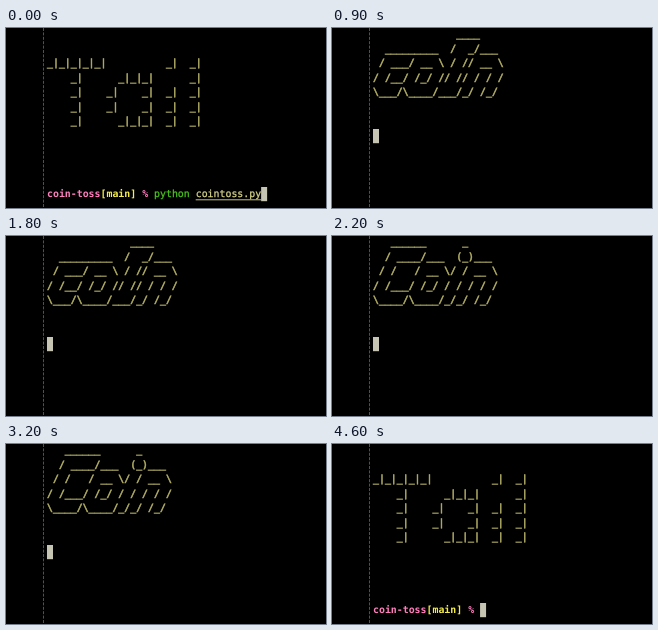
Write an HTML page that moves like this. It is 320 by 180 pixels and loops after 4900 ms.

```html
<!DOCTYPE html>
<html lang="en">
<head>
<meta charset="utf-8">
<title>Coin toss</title>
<style>
  html, body { margin: 0; width: 100%; height: 100%; overflow: hidden; background: #000; }
  svg { display: block; width: 100vw; height: 100vh; }
  text {
    font: 9.88px "DejaVu Sans Mono", "Liberation Mono", monospace;
    white-space: pre;
    text-rendering: geometricPrecision;
  }
  .art { fill: #b4b066; stroke: #b4b066; stroke-width: .55; }
  .bold { font-weight: bold; }
  .dir, .sign { fill: #ff7fbe; }
  .branch { fill: #f4ee4e; }
  .cmd { fill: #48c81c; stroke: #48c81c; stroke-width: .25; }
  .file { fill: #d9d68c; stroke: #d9d68c; stroke-width: .25; }
  .edge { stroke: #59552a; stroke-dasharray: 3 1.4; }
  .rule { stroke: #c4c07c; }
  #cursor { fill: #c6c4b2; }
</style>
</head>
<body>
<svg id="stage" viewBox="0 0 320 180">
  <rect width="320" height="180"/>
  <line class="edge" x1="37.5" y1="0" x2="37.5" y2="180"/>
  <g id="prompt">
    <text x="41" y="169.4"><tspan class="bold dir">coin-toss</tspan><tspan class="bold branch">[main]</tspan> <tspan class="bold sign">%</tspan></text>
    <g id="command">
      <text x="148.1" y="169.4"><tspan class="cmd">python</tspan> <tspan class="file">cointoss.py</tspan></text>
      <line class="rule" x1="189.7" y1="171.8" x2="255.2" y2="171.8"/>
    </g>
  </g>
  <rect id="cursor" width="6" height="14.2"/>
</svg>
<script>
const LOOP = 4900, START = 410, STEP = 218, TURNS = 16;
const LEFT = 41, COL = 5.948, ROW = 14.5, BASE = 9.1;

const coins = [
String.raw`   ______      _
  / ____/___  (_)___
 / /   / __ \/ / __ \
/ /___/ /_/ / / / / /
\____/\____/_/_/ /_/`,
String.raw`        ____  _
  _____/ __ \(_)___
 / ___/ / / / / __ \
/ /__/ /_/ / / / / /
\___/\____/_/_/ /_/`,
String.raw`              ____
  _________  /  _/___
 / ___/ __ \ / // __ \
/ /__/ /_/ // // / / /
\___/\____/___/_/ /_/`,
String.raw`              _ _   __
  _________  (_) | / /
 / ___/ __ \/ /  |/ /
/ /__/ /_/ / / /|  /
\___/\____/_/_/ |_/`
];

const tail = `_|_|_|_|_|          _|  _|
    _|      _|_|_|      _|
    _|    _|    _|  _|  _|
    _|    _|    _|  _|  _|
    _|      _|_|_|  _|  _|`;

const byId = id => document.getElementById(id);
const stage = byId("stage"), prompt = byId("prompt"), command = byId("command"), cursor = byId("cursor");
const NS = "http://www.w3.org/2000/svg";

function banner(art, topRow) {
  const g = document.createElementNS(NS, "g");
  g.setAttribute("class", "art");
  art.split("\n").forEach((line, i) => {
    const text = document.createElementNS(NS, "text");
    text.setAttribute("x", LEFT);
    text.setAttribute("y", (topRow + i) * ROW + BASE);
    text.textContent = line;
    g.append(text);
  });
  stage.insertBefore(g, cursor);
  return g;
}

const coinViews = coins.map(art => banner(art, 0));
const tailView = banner(tail, 2);

const show = (el, on) => el.setAttribute("visibility", on ? "visible" : "hidden");

function moveCursor(col, row) {
  cursor.setAttribute("x", LEFT + col * COL);
  cursor.setAttribute("y", row * ROW - .5);
}

function draw(ms) {
  // the screen refreshes ten times a second
  const t = Math.floor(ms % LOOP / 100) * 100;
  const turn = Math.floor((t - START) / STEP);
  const tossing = turn >= 0 && turn < TURNS;

  coinViews.forEach((view, i) => show(view, tossing && turn % 4 === i));
  show(tailView, !tossing);
  show(prompt, !tossing);
  show(command, turn < 0);

  if (tossing) moveCursor(0, 7);
  else if (turn >= TURNS) moveCursor(18, 11);
  else if (t < 100) moveCursor(36, 11);
  else moveCursor(0, 12);
}

const begin = performance.now();
function tick() {
  draw(performance.now() - begin);
  requestAnimationFrame(tick);
}
tick();
</script>
</body>
</html>
```
